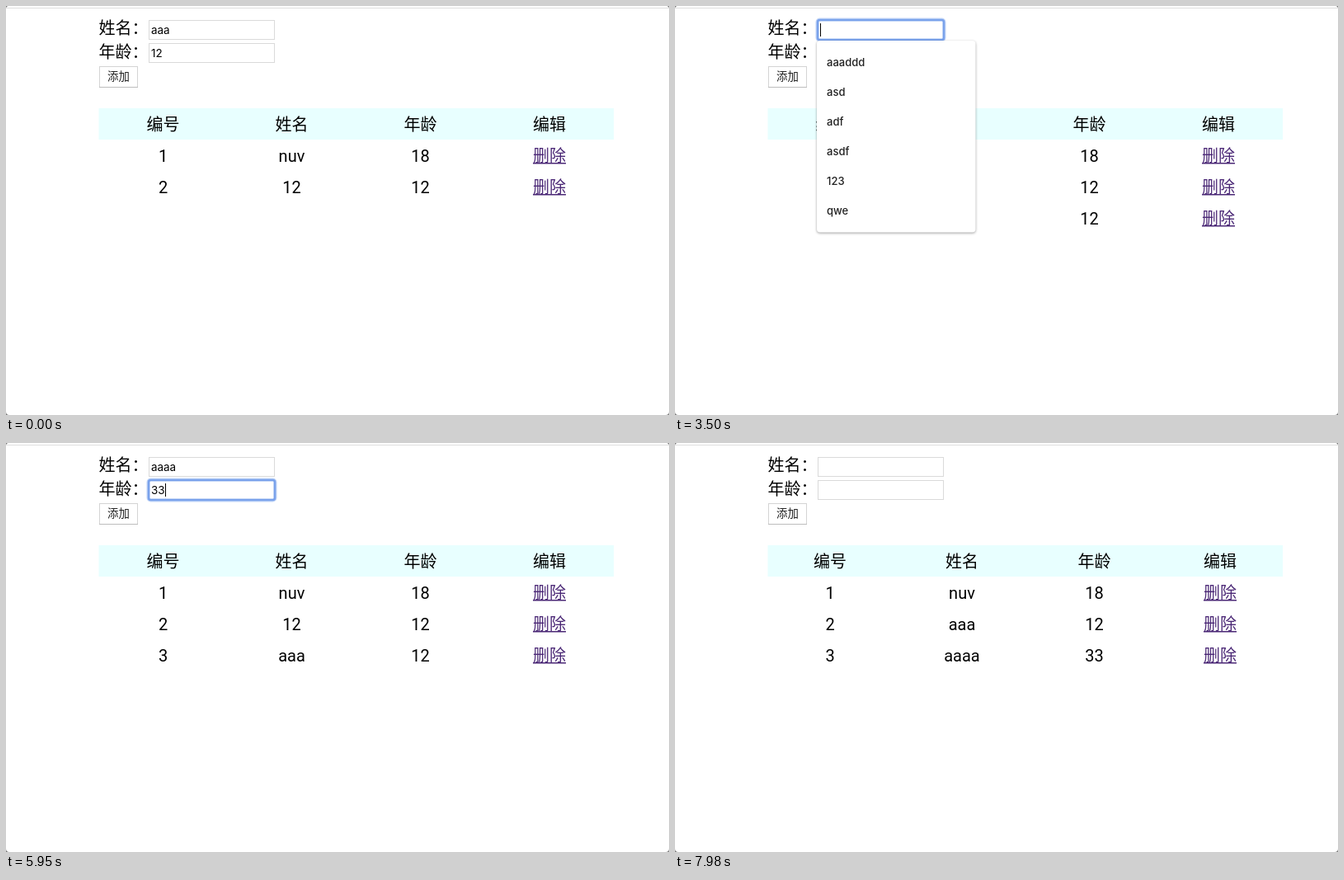
Animation of 804 by 496 pixels, one loop 8000 ms. Source, as an HTML page:

```html
<!DOCTYPE html>
<html lang="zh-CN">
<head>
<meta charset="utf-8">
<title>添加与删除</title>
<style>
  html, body { margin: 0; width: 100%; height: 100%; overflow: hidden; background: #fff; }
  svg { display: block; }
  text { white-space: pre; }
  .cell { font: 20px Roboto, "Noto Sans CJK SC", "Noto Sans CJK", sans-serif; fill: #000; }
  .mid { text-anchor: middle; }
  .link { fill: #4b2876; }
  .value { font: 13.4px Inter, sans-serif; fill: #000; }
  .hint { font: 500 13px Inter, sans-serif; fill: #222; }
  .button { font: 13.4px "Noto Sans CJK SC", "Noto Sans CJK", sans-serif; fill: #222; }
  .menu { fill: #fff; filter: drop-shadow(0 1px 1.5px rgba(0, 0, 0, .38)); }
</style>
</head>
<body>
<svg id="stage" width="804" height="496" viewBox="0 0 804 496"></svg>
<script>
const LOOP = 8000;
const BLINK = 500;
const stage = document.getElementById('stage');

const people = { first: ['nuv', 18], second: [12, 12], third: ['aaa', 12], fourth: ['aaaa', 33] };
const narrow = [190.5, 346.5, 502.5, 659];
const wide = [188, 348, 508.5, 661];
const hints = ['aaaddd', 'asd', 'adf', 'asdf', '123', 'qwe'];

// Each step changes only the listed parts of the state.
const steps = [
  [0, { name: 'aaa', age: '12', focus: '', menu: 0, columns: narrow, rows: ['first', 'second'] }],
  [1820, { focus: 'age' }],
  [2660, { focus: 'button' }],
  [2730, { name: '', age: '', rows: ['first', 'second', 'third'] }],
  [3360, { focus: 'name' }],
  [3430, { menu: 6 }],
  [3920, { name: 'a', menu: 4 }],
  [4130, { name: 'aa', menu: 1 }],
  [4340, { name: 'aaa' }],
  [4480, { name: 'aaaa', menu: 0 }],
  [5040, { focus: 'age' }],
  [5530, { age: '3' }],
  [5740, { age: '33' }],
  [6300, { focus: 'button' }],
  [6370, { name: '', age: '', columns: wide, rows: ['first', 'second', 'third', 'fourth'] }],
  [7840, { focus: '' }],
  [7910, { rows: ['first', 'third', 'fourth'] }]
];

const text = (x, y, value, style) => `<text x="${x}" y="${y}" class="${style}">${value}</text>`;
const rect = (x, y, w, h, attrs) => `<rect x="${x}" y="${y}" width="${w}" height="${h}" ${attrs}/>`;

function ring(x, y, w, h, gap) {
  const edge = (grow, color, width) => rect(x - grow, y - grow, w + 2 * grow, h + 2 * grow,
    `rx="${2 + grow}" fill="none" stroke="${color}" stroke-width="${width}"`);
  return edge(gap + .5, '#c3d6f7', 4) + edge(gap, '#7aa2eb', 2.6);
}

function field(id, y, state) {
  const focused = state.focus === id;
  return rect(173.5, y + .5, 152, 23, 'fill="#fff" stroke="#dadada"')
    + (focused ? ring(173.5, y + .5, 152, 23, .5) : '')
    + `<text id="${id}" x="176" y="${y + 17}" class="value">${state[id]}</text>`
    + (focused ? rect(176, y + 4, 1, 16, 'id="caret" fill="#000"') : '');
}

function button(focused) {
  return rect(113.5, 73.5, 46, 25, 'fill="#fff" stroke="#d4d4d4"')
    + rect(113, 98, 47, 1, 'fill="#bdbdbd"')
    + (focused ? ring(113.5, 73.5, 46, 25, 1.5) : '')
    + text(136.5, 90, '添加', 'button mid');
}

function row(cells, index, columns) {
  const y = 150.5 + 38 * index;
  return cells.map((value, i) => text(columns[i], y, value, 'cell mid')).join('');
}

function table({ columns, rows }) {
  const body = rows.map((key, i) => {
    const y = 188.5 + 38 * i;
    return row([i + 1, ...people[key]], i + 1, columns)
      + text(columns[3], y, '删除', 'cell mid link')
      + rect(columns[3] - 20, y + 1.5, 40, 1.5, 'class="link"');
  });
  return rect(112.5, 124, 624.5, 38, 'fill="#e8ffff"')
    + row(['编号', '姓名', '年龄', '编辑'], 0, columns) + body.join('');
}

function menu(count) {
  if (!count) return '';
  return rect(172, 42, 192.5, 16.5 + 36 * count, 'rx="4" class="menu"')
    + hints.slice(0, count).map((hint, i) => text(184, 73 + 36 * i, hint, 'hint')).join('');
}

function draw(state) {
  stage.innerHTML = rect(0, 2, 804, 1, 'fill="#dedede"')
    + '<path d="M0 0h2l-2 2zM804 0h-2l2 2zM0 496v-4q0 4 4 4zM804 496v-4q0 4-4 4z" fill="#777"/>'
    + text(112.5, 34.3, '姓名：', 'cell') + text(112.5, 62.6, '年龄：', 'cell')
    + field('name', 17, state) + field('age', 45, state)
    + button(state.focus === 'button') + table(state) + menu(state.menu);
  const caret = document.getElementById('caret');
  if (caret) {
    const width = document.getElementById(state.focus).getComputedTextLength();
    caret.setAttribute('x', Math.round(176 + width));
  }
}

const start = performance.now();
let shown = -1;

function tick() {
  const time = (performance.now() - start) % LOOP;
  const current = steps.findLastIndex(([at]) => at <= time);
  if (current !== shown) {
    draw(Object.assign({}, ...steps.slice(0, current + 1).map(step => step[1])));
    shown = current;
  }
  const caret = document.getElementById('caret');
  if (caret) {
    const phase = Math.floor((time - steps[current][0]) / BLINK) % 2;
    caret.setAttribute('opacity', 1 - phase);
  }
  requestAnimationFrame(tick);
}
tick();
</script>
</body>
</html>
```
